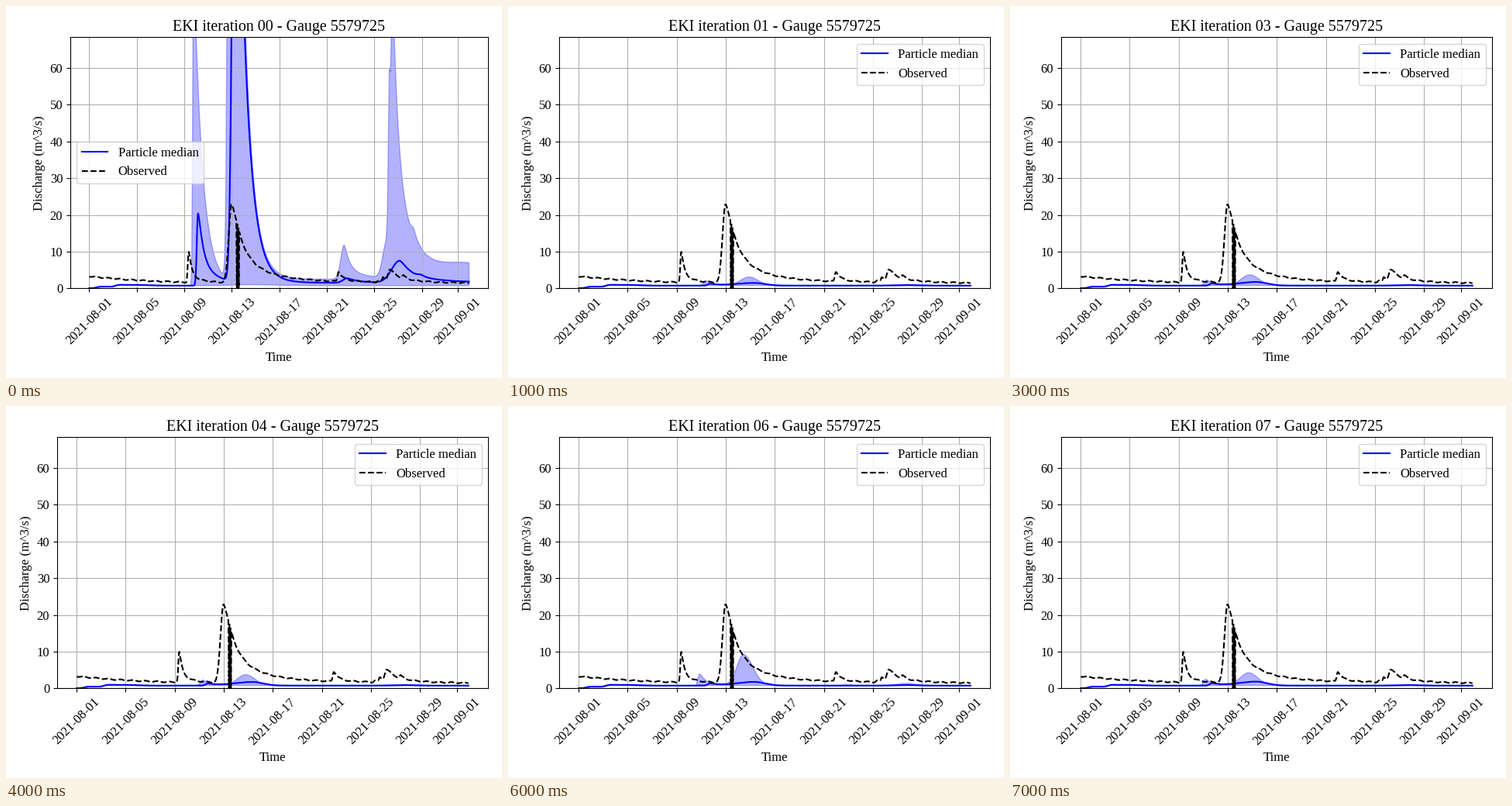
Recreate the animation shown at these times as a matplotlib script. Size 640x480 px, loop 8000 ms.

```python
import numpy as np
import matplotlib
import matplotlib.pyplot as plt
from matplotlib.animation import FuncAnimation

matplotlib.rcParams.update({
    "font.family": "Liberation Serif",
    "font.size": 12,
    "axes.titlesize": "large",
})

W, H, DPI = 640, 480, 100
T = np.arange(768) / 24  # hourly samples, in days
TICK_DAYS = [*range(0, 29, 4), 31]

# Ways a flow can recede after its peak, from long-tailed to abrupt
SLOW = lambda x: 1 / (1 + x ** 1.5)
STEADY = lambda x: np.exp(-x)
BRISK = lambda x: np.exp(-x ** 2)


def pulse(peak, height, rise, fall, recede=SLOW):
    """Hydrograph of one rain event; rise and fall are time scales in days."""
    d = T - peak
    return height * np.where(d < 0, np.exp(-(d / rise) ** 2),
                             recede(np.maximum(d, 0) / fall))


def ease(start, end):
    s = np.clip((T - start) / (end - start), 0, 1)
    return s * s * (3 - 2 * s)


def spin_up():
    """Base flow of the model as it fills up from a dry start."""
    return 0.05 + 0.42 * ease(0.2, 1) + 0.5 * ease(1.8, 2.6) - 0.22 * ease(3.5, 6.5)


def observed():
    base = 1.1 + 2.2 * np.exp(-T / 6)
    daily = 0.14 * np.cos(2 * np.pi * (T - 0.58))
    flow = (base + daily
            + pulse(8.36, 8.4, 0.1, 0.24)
            + pulse(11.98, 21.5, 0.34, 0.95)
            + pulse(20.98, 2.7, 0.12, 0.33)
            + pulse(24.35, 0.5, 0.15, 0.4)
            + pulse(24.73, 1.1, 0.08, 0.25)
            + pulse(25.28, 3.2, 0.2, 0.75)
            + pulse(26.42, 0.8, 0.12, 0.25))
    flow[298:303:2] = 0  # sensor dropouts
    return flow


def wild():
    """Lower, median and upper curve before the first update."""
    base = spin_up()
    median = (base + 0.6 * ease(11, 16)
              + pulse(9.15, 19.8, 0.14, 0.47)
              + pulse(12.3, 185, 0.335, 0.77, STEADY)
              + pulse(21.7, 1.25, 0.5, 0.8)
              + pulse(26.12, 6, 0.95, 1)
              + pulse(27.9, 0.5, 0.35, 0.4))
    upper = (base + 1.75 * ease(11, 16) + 2.4 * ease(28, 32)
             + pulse(8.78, 92, 0.1, 0.72, STEADY)
             + pulse(11.9, 368, 0.25, 0.75, STEADY)
             + pulse(21.45, 9.3, 0.4, 0.48)
             + pulse(25, 9.5, 0.45, 0.5, STEADY)
             + pulse(25.27, 48, 0.15, 0.2, STEADY)
             + pulse(25.53, 62, 0.17, 0.65)
             + pulse(27.3, 2.2, 0.25, 0.35))
    lower = base + pulse(13.5, 0.25, 2, 3, BRISK)
    return np.minimum(lower, median), median, np.maximum(median, upper)


def calm(growth, band=None):
    """Curves after an update; growth in 0..1 sets how far the bumps have risen."""
    base = spin_up()
    median = (base
              + pulse(10.72, 0.5 + 0.15 * growth, 0.25, 0.6)
              + pulse(14.33, 0.7 + 0.35 * growth ** 0.5, 2, 1.2, BRISK)
              + pulse(26.8, 0.15, 1.5, 1.2, BRISK))
    if band is None:
        lead = 0.18 * growth
        band = (0.1 + pulse(10.33 - lead, 1.3 + 0.4 * growth, 0.25, 0.45, BRISK)
                + pulse(13.86 - lead, 2.35 + 1.15 * growth, 1, 1.05, BRISK))
    return np.minimum(median, 0.9), median, np.maximum(median, base + band)


def surge():
    band = (pulse(9.84, 3.3, 0.2, 0.46)
            + pulse(13.4, 8.4, 0.75, 1.1, BRISK)
            + pulse(21.8, 0.3, 0.6, 1, BRISK)
            + pulse(26.7, 0.7, 1.2, 1.2, BRISK))
    return calm(0.6, band)


OBSERVED = observed()
STEPS = [wild(), *map(calm, (0, 0.45, 0.52, 0.54, 0.56)), surge(), calm(1)]

fig = plt.figure(figsize=(W / DPI, H / DPI), dpi=DPI, facecolor="white")
ax = fig.add_axes([0.1, 0.24, 0.87, 0.67])


def place(left, top=40.27, right=622, bottom=364.35):
    ax.set_position([left / W, 1 - bottom / H, (right - left) / W, (bottom - top) / H])


def day_label(day):
    return str(np.datetime64("2021-08-01") + day)


def update(i):
    lower, median, upper = STEPS[i]
    first = i == 0
    ax.clear()
    place(82.93 if first else 65.93)
    ax.fill_between(T, lower, upper, color="b", alpha=0.3)
    ax.plot(T, median, color="b", label="Particle median")
    ax.plot(T, OBSERVED, "k--", label="Observed")
    ax.set_xlim(-0.05 * T[-1], 1.05 * T[-1])
    ax.set_ylim(0, 68.4)
    ax.set_xticks(TICK_DAYS, [day_label(d) for d in TICK_DAYS], rotation=45)
    ax.set_yticks(range(0, 61, 10))
    ax.grid(True)
    ax.set_xlabel("Time")
    ax.set_ylabel("Discharge (m^3/s)")
    ax.set_title(f"EKI iteration {i:02d} - Gauge 5579725")
    ax.legend(loc="center left" if first else "upper right")
    return []


anim = FuncAnimation(fig, update, frames=len(STEPS), interval=1000,
                     repeat=True, repeat_delay=0)
plt.show()
```
